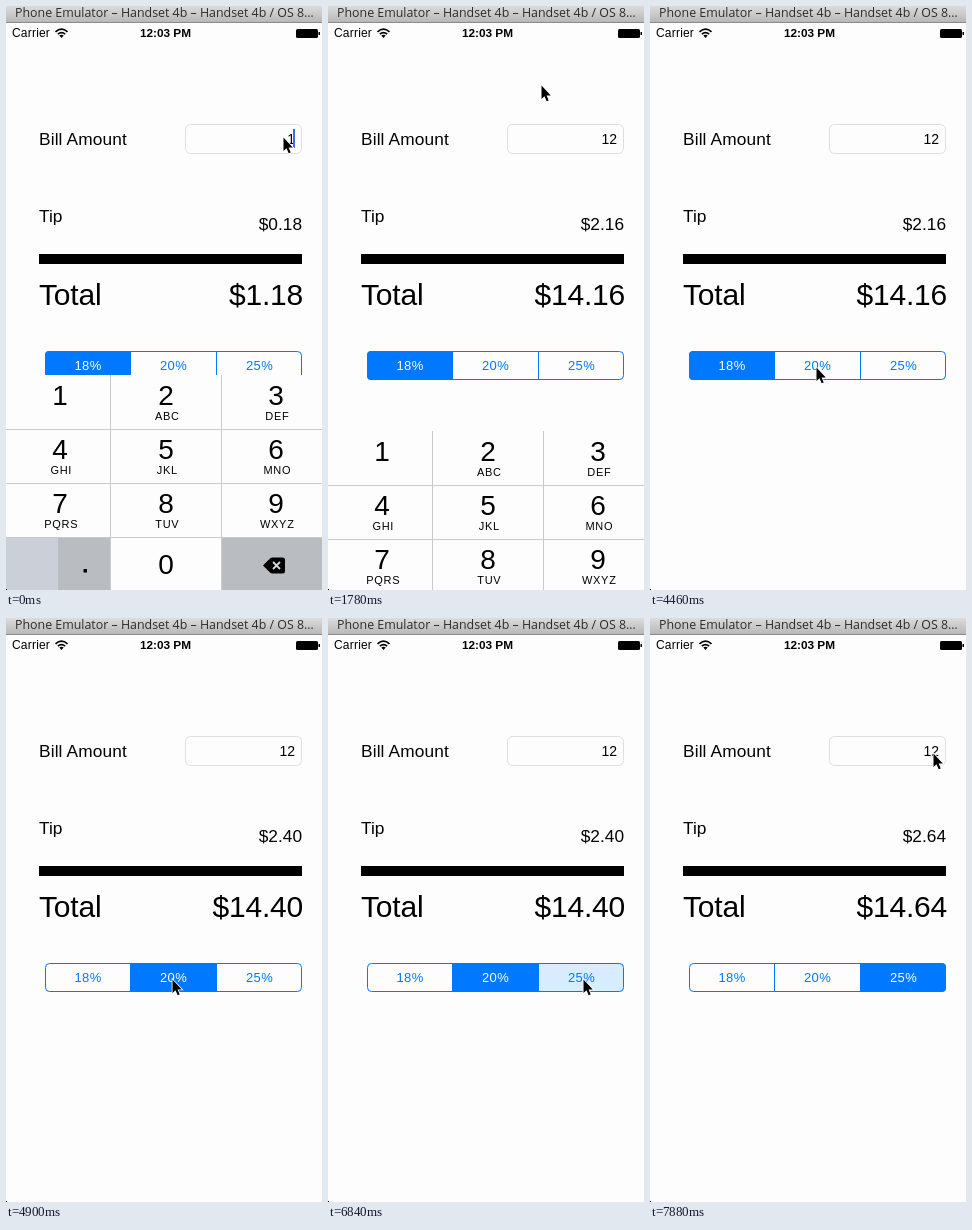
An HTML page for the animation above (8 s loop, 316 px wide and 584 px high).

```html
<!DOCTYPE html>
<html lang="en">
<head>
<meta charset="utf-8">
<title>Tip calculator</title>
<style>
  html, body { margin: 0; width: 100%; height: 100%; overflow: hidden; background: #fdfdfd; }
  svg { display: block; width: 316px; height: 584px; font-family: "Liberation Sans", Arial, sans-serif; }
  text { white-space: pre; }
  .end { text-anchor: end; }
  .mid { text-anchor: middle; }
  .label { font-size: 17.3px; }
  .total { font-size: 30px; letter-spacing: -.2px; }
  .seg { font-size: 13px; letter-spacing: .4px; }
  .digit { font-size: 28px; }
  .abc { font-size: 11px; letter-spacing: .7px; }
</style>
</head>
<body>
<svg viewBox="0 0 316 584">
  <defs>
    <linearGradient id="chrome" x2="0" y2="1">
      <stop stop-color="#dcdcdc"/><stop offset="1" stop-color="#b8b8b8"/>
    </linearGradient>
    <clipPath id="round"><rect x="39" y="345" width="257" height="29" rx="4"/></clipPath>
  </defs>
  <rect width="316" height="584" fill="#fdfdfd"/>

  <rect width="316" height="16" fill="url(#chrome)"/>
  <path d="M0 16.5H316" stroke="#8a8a8a"/>
  <text x="9" y="11" font-size="12.4" fill="#2c2c2c" font-family="Open Sans, sans-serif">Phone Emulator – Handset 4b – Handset 4b / OS 8…</text>

  <text x="6" y="31" font-size="12" letter-spacing=".2">Carrier</text>
  <g fill="none" stroke="#000" stroke-width="1.7">
    <path d="M49.5 25.8Q55.5 20.4 61.5 25.8M51.8 28.2Q55.5 25 59.2 28.2"/>
    <path d="M53.3 29.6Q55.5 27.8 57.7 29.6L55.5 32Z" fill="#000" stroke="none"/>
  </g>
  <text x="159.5" y="31" font-size="11.8" font-weight="bold" class="mid">12:03 PM</text>
  <rect x="290" y="23" width="22" height="9" rx="1.5"/>
  <rect x="312.5" y="26" width="1.5" height="3"/>

  <text x="33" y="138.6" class="label" letter-spacing=".13">Bill Amount</text>
  <rect x="179.5" y="118.5" width="116" height="29" rx="5" fill="#fdfdfd" stroke="#dedede"/>
  <text id="bill" x="289" y="138" font-size="14" class="end"></text>
  <rect id="caret" x="287" y="123" width="2" height="19" fill="#426bf2"/>
  <text x="33" y="216" class="label">Tip</text>
  <text id="tip" x="296" y="224" class="label end"></text>
  <rect x="33" y="248" width="263" height="10"/>
  <text x="33" y="299.2" class="total">Total</text>
  <text id="total" x="297" y="299.2" class="total end"></text>

  <g id="segs" clip-path="url(#round)"></g>
  <path d="M124.5 345V374M210.5 345V374" stroke="#0078ff"/>
  <rect x="39.5" y="345.5" width="256" height="28" rx="4" fill="none" stroke="#0078ff"/>

  <g id="pad"></g>
  <rect y="583" width="1" height="1"/>
  <g id="mouse"><path d="M.5 .5V14L3.5 11.2 5.7 16.3 7.7 15.4 5.6 10.5H9.8Z" stroke="#fff" paint-order="stroke" stroke-width="1.6"/></g>
</svg>
<script>
const $ = id => document.getElementById(id);
const LOOP = 8000, TICK = 148.5;
const labels = [18, 20, 25], rates = [.18, .2, .22];
const centers = [82, 167.5, 253.5], edges = [39, 124, 211, 296];

$('segs').innerHTML = labels.map((r, i) =>
  `<rect x="${edges[i]}" y="345" width="${edges[i + 1] - edges[i]}" height="29"/>
   <text x="${centers[i]}" y="364" class="seg mid">${r}%</text>`).join('');
const boxes = document.querySelectorAll('#segs rect');
const names = document.querySelectorAll('#segs text');

const letters = ['', 'ABC', 'DEF', 'GHI', 'JKL', 'MNO', 'PQRS', 'TUV', 'WXYZ'];
const cols = [54, 160, 270];
$('pad').innerHTML = `<rect y="369" width="316" height="215" fill="#fdfdfd"/>
  <rect y="531" width="52" height="53" fill="#cbcfd8"/>
  <rect x="52" y="531" width="53" height="53" fill="#b9bcc1"/>
  <rect x="215" y="531" width="101" height="53" fill="#b9bcc1"/>
  <path d="M0 423.5H316M0 477.5H316M0 531.5H316M104.5 369V584M215.5 369V584" stroke="#c9cacc"/>` +
  letters.map((s, i) => {
    const x = cols[i % 3], y = 54 * Math.floor(i / 3);
    return `<text x="${x}" y="${y + 399}" class="digit mid">${i + 1}</text>
      <text x="${x + 1.3}" y="${y + 414}" class="abc mid">${s}</text>`;
  }).join('') +
  `<text x="160" y="568" class="digit mid">0</text>
  <rect x="77.5" y="563" width="3.5" height="3.5"/>
  <path d="M257 559.5L264 552.5Q265 551.5 266.5 551.5H276.5Q279 551.5 279 554V565Q279 567.5 276.5 567.5H266.5Q265 567.5 264 566.5Z"/>
  <path d="M267 556L274 563M274 556L267 563" stroke="#d5d7da" stroke-width="1.8"/>`;

// Pointer path: tick, x, y
const path = [
  [7, 277, 131], [10, 213, 79], [18, 213, 79], [19, 210, 148], [21, 146, 377], [22, 146, 377],
  [24, 165, 361], [29, 165, 361], [30, 166, 361], [38, 166, 361], [39, 174, 361], [41, 240, 360],
  [42, 255, 361], [48, 255, 361], [49, 262, 340], [51, 294, 240], [52, 292, 175], [53, 283, 135]
];

function pointer(n) {
  const k = path.findIndex(p => p[0] >= n);
  if (k < 1) return path[k ? path.length - 1 : 0].slice(1);
  const a = path[k - 1], b = path[k], u = (n - a[0]) / (b[0] - a[0]);
  return [1, 2].map(i => Math.round(a[i] + (b[i] - a[i]) * u));
}

function caretAlpha(n) {
  if (n >= 12 || n === 6 || n === 7) return 0;
  return n === 5 || n === 8 ? .5 : 1;
}

function draw(t) {
  const n = Math.floor((t + 8) / TICK);
  const bill = n < 1 ? 1 : 12;
  const pick = n < 33 ? 0 : n < 47 ? 1 : 2;
  const press = n === 32 ? 1 : n === 46 ? 2 : -1;
  const tip = bill * rates[pick];
  $('bill').textContent = bill;
  $('tip').textContent = '$' + tip.toFixed(2);
  $('total').textContent = '$' + (bill + tip).toFixed(2);
  boxes.forEach((b, i) => {
    b.setAttribute('fill', i === pick ? '#0078ff' : i === press ? '#d8ebff' : '#fdfdfd');
    names[i].setAttribute('fill', i === pick ? '#fff' : '#0078ff');
  });
  $('caret').setAttribute('opacity', caretAlpha(n));

  const u = Math.min(1, Math.max(0, (n - 11) / 3));
  $('pad').setAttribute('transform', `translate(0 ${Math.round(215 * u * u * (3 - 2 * u))})`);
  $('mouse').setAttribute('transform', `translate(${pointer(n)})`);
}

const start = performance.now();
(function loop() {
  draw((performance.now() - start) % LOOP);
  requestAnimationFrame(loop);
})();
</script>
</body>
</html>
```
